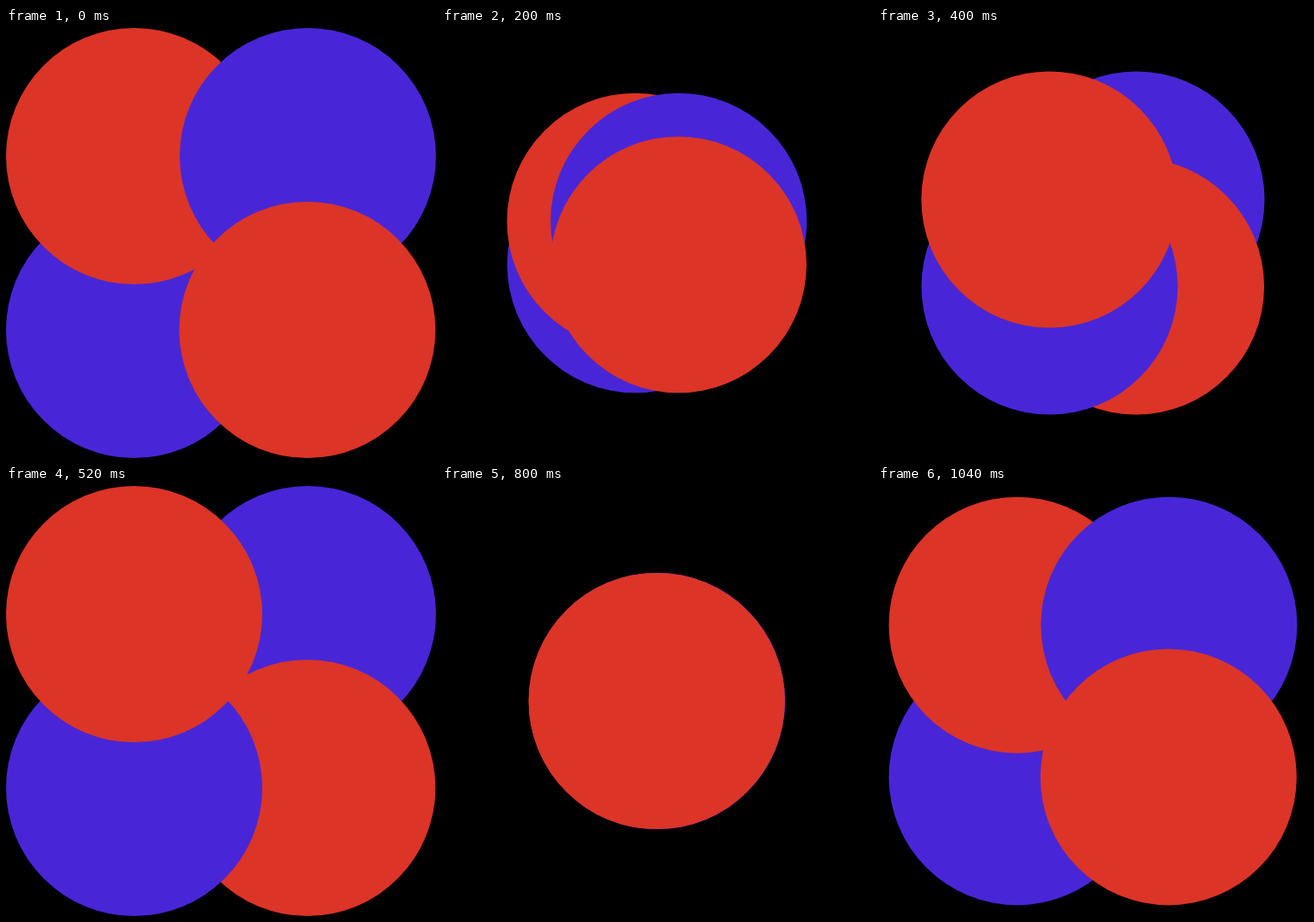
Write an HTML page with a canvas that moves like this. It is 500 by 500 pixels and loops after 1080 ms.

```html
<!DOCTYPE html>
<html lang="en">
<head>
<meta charset="utf-8">
<title>Four circles</title>
<style>
  html, body { margin: 0; width: 100%; height: 100%; overflow: hidden; background: #000; }
  canvas { display: block; width: 500px; height: 500px; }
</style>
</head>
<body>
<canvas id="stage" width="500" height="500"></canvas>
<script>
const ctx = document.getElementById('stage').getContext('2d');
const LOOP = 1080, HOLD = 40;
const STEPS = 32, STEPS_PER_HOLD = 1.2;
const RADIUS = 149;
const RED = '#dc3427', BLUE = '#4826d7';

// Bottom to top; sx and sy give the starting corner.
const circles = [
  { color: BLUE, sx: -1, sy: 1, cx: 250, reach: 101 },
  { color: RED, sx: -1, sy: -1, cx: 249.7, reach: 100.7 },
  { color: BLUE, sx: 1, sy: -1, cx: 250, reach: 101 },
  { color: RED, sx: 1, sy: 1, cx: 249.7, reach: 100.7 }
];

// Triangle wave: 1 at the starting corner, -1 at the opposite one.
function swing(time) {
  const tick = Math.floor((time % LOOP) / HOLD + 1e-6);
  const step = Math.round(tick * STEPS_PER_HOLD) % STEPS;
  return Math.abs(step - STEPS / 2) / (STEPS / 4) - 1;
}

function draw(time) {
  const s = swing(time);
  ctx.fillStyle = '#000';
  ctx.fillRect(0, 0, 500, 500);
  for (const c of circles) {
    ctx.fillStyle = c.color;
    ctx.beginPath();
    ctx.arc(c.cx + c.sx * c.reach * s, 250 + c.sy * 101 * s, RADIUS, 0, Math.PI * 2);
    ctx.fill();
  }
}

const start = performance.now();
function frame() {
  draw(Math.max(0, performance.now() - start));
  requestAnimationFrame(frame);
}
draw(0);
requestAnimationFrame(frame);
</script>
</body>
</html>
```
